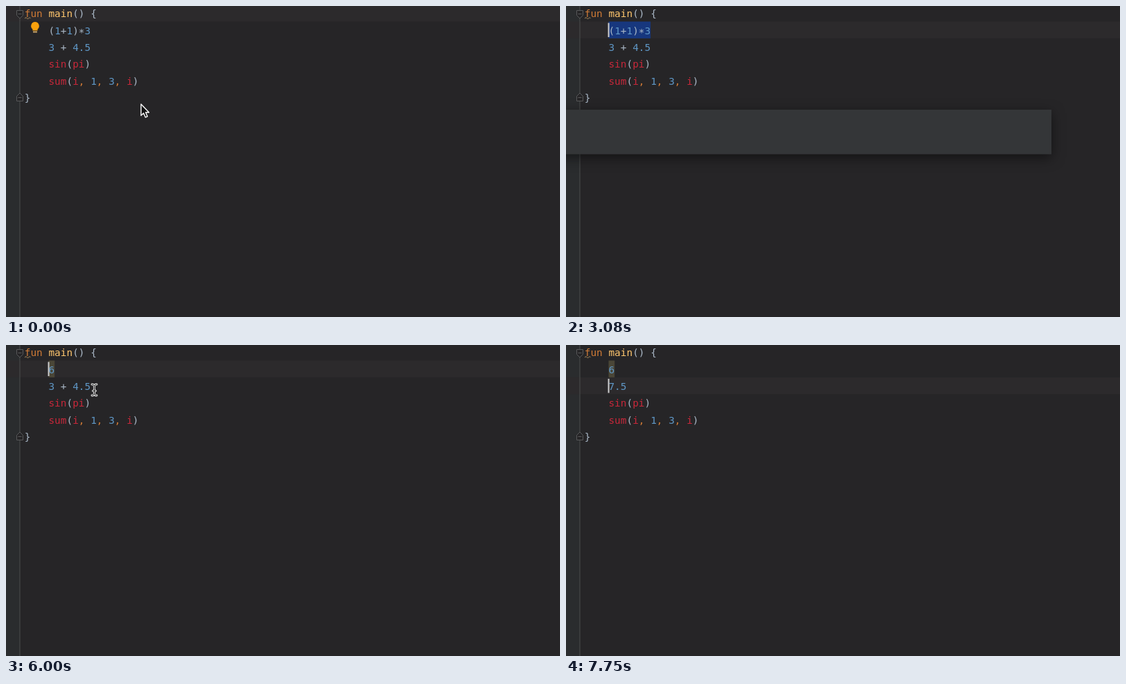
Write an HTML page that moves like this. It is 800 px wide and 450 px high and loops after 8 s.

```html
<!DOCTYPE html>
<html lang="en">
<head>
<meta charset="utf-8">
<title>Inline evaluation</title>
<style>
  html, body { margin: 0; width: 100%; height: 100%; overflow: hidden; background: #262527; }
  svg { display: block; width: 800px; height: 450px; }
  .code { font: 14.4px "DejaVu Sans Mono", monospace; }
  .ui { font: 14.5px Inter, sans-serif; fill: #bbbdbf; }
  .end { text-anchor: end; }
  .dim { fill: #77797b; }
  #popup { filter: drop-shadow(0 5px 9px rgba(0, 0, 0, .5)); }
</style>
</head>
<body>
<svg viewBox="0 0 800 450" xmlns="http://www.w3.org/2000/svg">
  <rect width="800" height="450" fill="#262527"/>
  <rect width="20" height="450" fill="#2a2c2e"/>
  <rect id="line" width="800" height="24.35" fill="#2c2a2c"/>
  <path d="M20 0V450" stroke="#4b4c4d"/>
  <g fill="#262527" stroke="#58595a">
    <path d="M15.5 6.5h9v7l-4.500 4.500l-4.500-4.500zM17.500 11.500h5"/>
    <path d="M15.500 137.500h9v-7l-4.500-4.500l-4.500 4.500zM17.500 132.500h5"/>
  </g>
  <path d="M27 18l2-1.500 2.500 2.500 2.500-2.500 1.500 1.500" fill="none" stroke="#a98b5c"/>
  <rect id="select" x="61.500" height="24.35" fill="#17377e"/>
  <rect id="mark" x="61.500" y="22.500" width="8.700" height="24.350" fill="#4a4637"/>
  <g id="code" class="code"></g>
  <g id="bulb">
    <path d="M42 23a5.900 5.900 0 0 1 3.600 10.500v2h-7.200v-2A5.900 5.900 0 0 1 42 23z" fill="#f9a10d"/>
    <path d="M39 37.500h6" stroke="#c9a468" stroke-width="2"/>
  </g>
  <rect id="caret" width="2" height="20.500" fill="#cfcfd0"/>

  <g id="popup">
    <rect id="panel" x="-20" y="150" width="721" fill="#343638"/>
    <g id="header">
      <rect y="150" width="701" height="33" fill="#3a3d3f"/>
      <rect x="225.500" y="150" width="79" height="32.500" fill="#4a4e51"/>
      <path d="M0 182.500H701" stroke="#2b2d2f"/>
      <g class="ui">
        <text x="14.500" y="171">Classes</text>
        <text x="94" y="171">Files</text>
        <text x="153.500" y="171">Symbols</text>
        <text x="239" y="171">Actions</text>
        <text x="484.500" y="171">Include disabled actions</text>
      </g>
      <rect x="462.500" y="158.500" width="14.500" height="14.500" rx="2" fill="none" stroke="#6c6f71"/>
      <path d="M670.500 159.500h13v12h-13z" fill="none" stroke="#5b5e60"/>
      <path d="M671 167h6v5h-6z" fill="#5b5e60"/>
      <rect y="183" width="701" height="31.500" fill="#313335"/>
      <rect y="190" width="179" height="18.500" fill="#1a59cd"/>
      <text class="ui end" x="178" y="204" style="fill:#f2f4f7">evaluate expression inline</text>
      <text class="ui" x="475.500" y="202" style="fill:#77797b">Press</text>
      <g fill="none" stroke="#85878a" stroke-width="1.200">
        <path d="M519 192.500h4.500l5 9.500h4M527.500 192.500h5"/>
        <path d="M545.500 192.500v6.500h-5.500v2.500l-5-4 5-4v2.500h3v-3.500z"/>
      </g>
      <text class="ui end" x="689" y="202" style="fill:#77797b">to assign a shortcut</text>
    </g>
    <g id="list">
      <rect y="214.500" width="701" height="25.500" fill="#1957c9"/>
      <rect y="240" width="701" height="25" fill="#323537"/>
      <rect x="-5" y="219" width="166.500" height="18" rx="3" fill="#bda866"/>
      <text class="ui end" x="160.500" y="233.500" style="fill:#17191b">Evaluate Expression Inline</text>
      <text class="ui end" x="226" y="258">Evaluate Selected Expression Inline</text>
      <text class="ui end" x="285" y="282.500">Plugins: Evaluate Selected Expression Inline</text>
      <text class="ui end" x="697" y="258" style="fill:#696b6d">Preferences &gt; Plugins</text>
      <rect x="644.500" y="268" width="51.500" height="18.500" rx="2" fill="#395b3e"/>
      <path d="M678 268h16a2 2 0 0 1 2 2v14.500a2 2 0 0 1-2 2h-16z" fill="#5b5c5d"/>
      <text class="ui" x="650" y="282.500" style="fill:#f0f0f0;font-weight:500">ON</text>
    </g>
  </g>

  <g id="mouse">
    <path id="arrow" d="M0 0V16.500L3.700 13L6.300 19L9.200 17.800L6.700 12H11.500Z" fill="#111" stroke="#fff" stroke-width="1.400" stroke-linejoin="round"/>
    <g id="beam" fill="none" stroke-linecap="round">
      <path d="M-3.500-8Q0-8 0-5.500Q0-8 3.500-8M0-5.500V5.500M-3.500 8Q0 8 0 5.500Q0 8 3.500 8M-2 1.500H2" stroke="#f4f4f4" stroke-width="2.800"/>
      <path d="M-3.500-8Q0-8 0-5.500Q0-8 3.500-8M0-5.500V5.500M-3.500 8Q0 8 0 5.500Q0 8 3.500 8M-2 1.500H2" stroke="#151515"/>
    </g>
  </g>
</svg>
<script>
const LOOP = 8000, LEFT = 26.8, CHAR = 8.667, ROW = 24.35;
const el = id => document.getElementById(id);
const show = (node, on) => node.setAttribute('display', on ? 'inline' : 'none');
const set = (node, attrs) => { for (const k in attrs) node.setAttribute(k, attrs[k]); };
const rowTop = row => row * ROW - 1.85;
const colX = col => LEFT + col * CHAR;
const within = (t, from, to) => t >= from && t < to;

const svgNode = (name, parent) =>
  parent.appendChild(document.createElementNS('http://www.w3.org/2000/svg', name));

const colors = [
  [/^(fun|,)$/, '#d17b36'],
  [/^main$/, '#ffc66d'],
  [/^\d/, '#5f97c6'],
  [/^[a-z]/, '#c9283a'],
  [/./, '#a9b7c6']
];

function addCode(row, col, source) {
  const group = svgNode('g', el('code'));
  for (const m of source.matchAll(/[a-z]+|[\d.]+|\S/g)) {
    const text = svgNode('text', group);
    text.textContent = m[0];
    set(text, {
      x: colX(col + m.index),
      y: rowTop(row) + 18 + (m[0] === '*' ? 2.5 : 0),
      fill: colors.find(c => c[0].test(m[0]))[1]
    });
  }
  return group;
}

addCode(0, 0, 'fun main() {');
const product = addCode(1, 4, '(1+1)*3');
const six = addCode(1, 4, '6');
const addition = addCode(2, 4, '3 + 4.5');
const decimal = addCode(2, 4, '7.5');
addCode(3, 4, 'sin(pi)');
addCode(4, 4, 'sum(i, 1, 3, i)');
addCode(5, 0, '}');

// Each path is a list of [time, x, y].
const firstMove = [[170, 195, 142], [960, 155, 83], [1500, 127.5, 41], [1920, 127.5, 41], [2600, 62, 41]];
const secondMove = [[5170, 66, 44], [5500, 216, 84], [5920, 127.5, 65], [6250, 127.5, 65], [6650, 38, 65]];

function along(path, t) {
  if (t <= path[0][0]) return path[0].slice(1);
  for (let i = 1; i < path.length; i++) {
    const [t0, x0, y0] = path[i - 1], [t1, x1, y1] = path[i];
    if (t < t1) {
      const u = (t - t0) / (t1 - t0), k = u * u * (3 - 2 * u);
      return [x0 + (x1 - x0) * k, y0 + (y1 - y0) * k];
    }
  }
  return path[path.length - 1].slice(1);
}

// Opening, header, list, closing, result.
const runs = [[3080, 3170, 3330, 4580, 4670], [7080, 7170, 7250, 7670, 7750]];
const clicks = [1670, 6083];
const blinkStarts = [250, 1670, 2600, 4670, 6083, 6650, 7750];

function render(t) {
  const row = t < clicks[0] ? 0 : t < clicks[1] ? 1 : 2;
  const [open, header, list, close, result] = runs[row === 2 ? 1 : 0];
  const [mx, my] = along(t < 4000 ? firstMove : secondMove, t);

  set(el('line'), { y: rowTop(row) });
  show(el('bulb'), row === 0);

  // Dragging left from the line end snaps the caret to whole columns.
  const editing = row > 0 && t < result;
  const col = row === 0 ? 0 : editing
    ? Math.max(4, Math.min(11, Math.round((mx - LEFT) / CHAR))) : 4;
  show(el('select'), editing && col < 11);
  set(el('select'), { x: colX(col), y: rowTop(row), width: (11 - col) * CHAR });

  const caretCol = row === 1 && t >= result ? 4 : col;
  const since = t - blinkStarts.filter(s => s <= t).pop();
  const dragging = within(t, 1670, 2600) || within(t, 6083, 6650);
  const focused = !within(t, header, result);
  set(el('caret'), { x: colX(caretCol) - .9, y: rowTop(row) + 2 });
  show(el('caret'), focused && (dragging || since % 1000 < 500));

  show(product, t < runs[0][4]);
  show(six, t >= runs[0][4]);
  show(addition, t < runs[1][4]);
  show(decimal, t >= runs[1][4]);
  show(el('mark'), t >= 4830);

  show(el('popup'), within(t, open, close));
  show(el('header'), t >= header);
  show(el('list'), t >= list);
  set(el('panel'), { height: t >= list ? 330 : 64.5 });

  show(el('mouse'), t < 2670 || within(t, 5170, 6750));
  set(el('mouse'), { transform: `translate(${mx} ${my})` });
  show(el('arrow'), t < 330);
  show(el('beam'), t >= 330);
}

const start = performance.now();
function frame() {
  render((performance.now() - start) % LOOP);
  requestAnimationFrame(frame);
}
frame();
</script>
</body>
</html>
```
